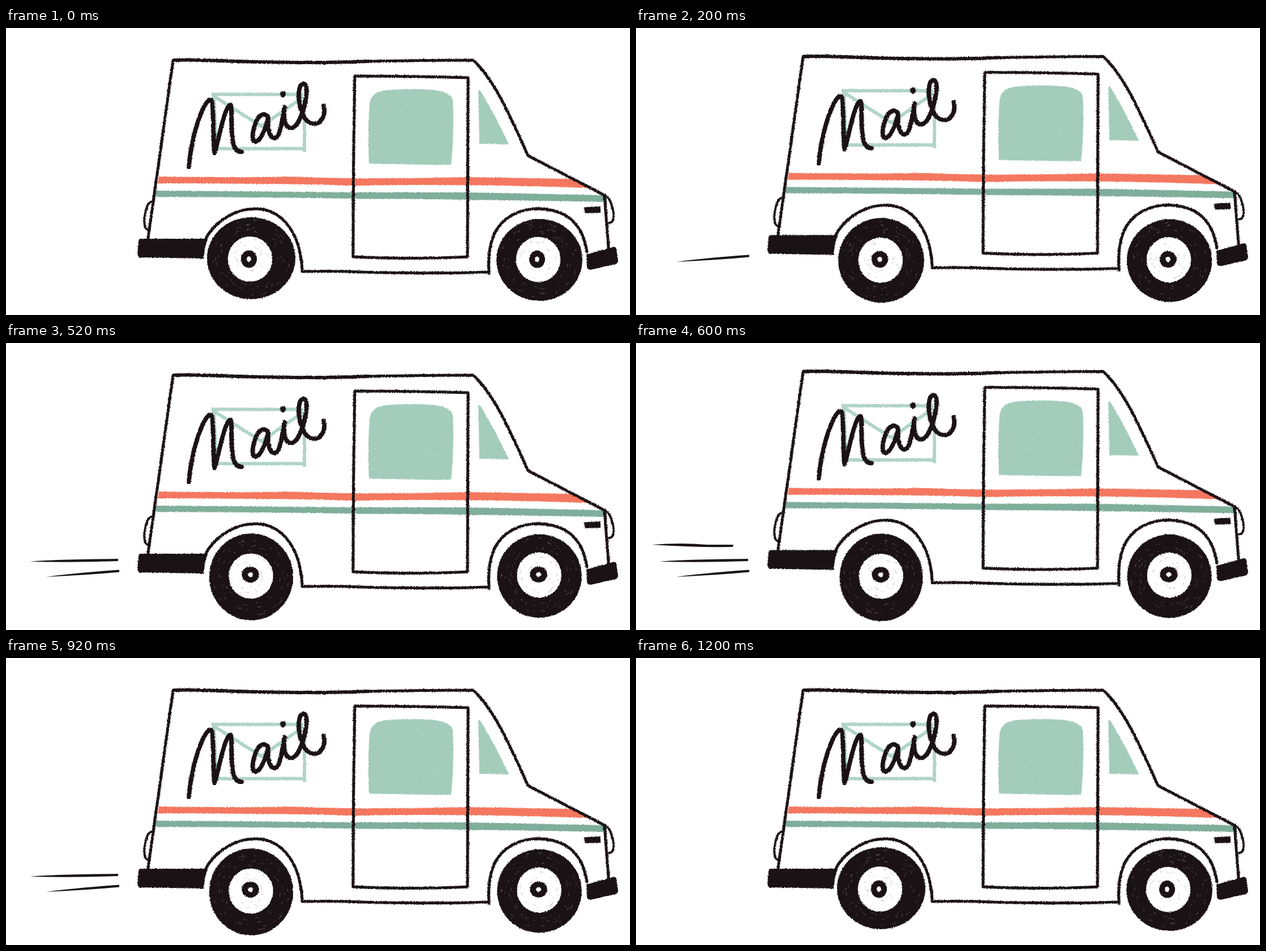
Animation of 1102 by 508 pixels, one loop 1400 ms. Source, as an HTML page:

```html
<!DOCTYPE html>
<html lang="en">
<head>
<meta charset="utf-8">
<title>Mail truck</title>
<style>
  html, body { margin: 0; height: 100%; overflow: hidden; background: #fff; }
  svg { display: block; width: 100vw; height: 100vh; }
  .line { fill: none; stroke: #1b1216; stroke-width: 5.1; stroke-linecap: round; stroke-linejoin: round; }
  .thin { stroke-width: 4; }
  .roof { stroke-width: 6; }
  .lettering { stroke-width: 7.8; }
  .ink { fill: #1b1216; }
  .paper { fill: #fff; }
  .glass { fill: #a3ccba; }
  .flecks { fill: none; stroke-width: .9; stroke-linecap: round; }
</style>
</head>
<body>
<svg viewBox="0 0 1102 508">
  <defs>
    <filter id="crayon" filterUnits="userSpaceOnUse" x="0" y="0" width="1102" height="520" color-interpolation-filters="sRGB">
      <feTurbulence type="fractalNoise" baseFrequency=".5" numOctaves="2" seed="4" result="noise"/>
      <feDisplacementMap in="SourceGraphic" in2="noise" scale="3.5" xChannelSelector="R" yChannelSelector="G"/>
    </filter>
  </defs>

  <g id="body" filter="url(#crayon)">
    <!-- windows, stripes, envelope -->
    <path class="glass" d="M641 240C639 200 640 150 643 130Q648 112 672 110Q715 106 757 110Q788 114 789 129Q792 180 786 242Q710 242 641 240Z"/>
    <path class="glass" d="M834 110L836 205L888 206Q862 150 837 110Z"/>
    <path id="glassFlecks" class="flecks" stroke="#c0ddd0"/>
    <path fill="#f4775f" d="M270 263Q440 265 500 263Q560 265 613 266Q720 266 815 264L997 267L1028 283Q900 279 815 278Q720 277 613 279Q500 275 268 275Z"/>
    <path fill="#7fae9b" d="M265 288Q440 289 613 291L815 291L1057 296V308Q820 303 613 302Q440 299 265 299Z"/>
    <path fill="none" stroke="#b0d4c7" stroke-width="6" stroke-linejoin="round" d="M363 117.5H525M367 118L371 213M372 213.5H527M527 122V219M366 120L451 174L525 122"/>

    <!-- shell, door, arches, lamps, bumpers -->
    <path class="line" d="M295 58L251 372M295 58Q315 55 350 57Q520 64 640 59Q740 57 825 57C857 86 882 136 922 226L1057 296L1064 389"/>
    <path class="line roof" d="M296 57Q315 56 350 57Q520 64 640 59"/>
    <path class="line" d="M616 85Q720 85 816 88Q815 240 815 405Q710 410 613 405Q613 240 616 85Z"/>
    <path class="line" d="M351 377C365 346 400 321 440 320C490 320 521 366 523 431Q560 430 600 431Q720 436 853 432M853 435C850 385 858 330 930 320C990 318 1018 346 1026 396"/>
    <path class="line thin" d="M256 308C247 310 243 340 245 349Q246 356 251 357M1057 297C1068 298 1074 325 1073 337Q1071 345 1065 345"/>
    <path class="ink" d="M238 373L356 373Q351 387 349 408L236 406Q232 404 232 398L234 378Q234 373 238 373ZM1025 401L1071 388Q1077 386 1078 391L1081 412Q1081 416 1076 418L1032 428Q1027 428 1026 423ZM1022 317L1050 316L1050 327L1023 328Q1020 322 1022 317Z"/>

    <g class="line lettering" role="img" aria-label="Mail">
      <path d="M323 246C325 215 335 170 348 143C354 130 362 121 364 132C367 150 365 190 368 221C374 208 380 165 390 144C394 135 398 133 398 143C398 165 398 192 402 207Q407 220 416 219"/>
      <path d="M463 158C455 147 445 155 440 170C434 188 434 201 441 201C450 200 458 178 463 160C461 178 466 196 475 195C485 192 487 165 492 140C489 165 494 178 505 177C520 173 530 130 531 112C531 98 523 94 519 105C514 122 519 146 528 160C535 170 548 173 555 165C563 157 563 146 561 138"/>
    </g>
    <circle class="ink" cx="489" cy="117" r="5.4"/>
  </g>

  <g id="wheels" filter="url(#crayon)"></g>

  <g id="speed" class="ink">
    <path d="M71 414Q110 408 200 401.5L200 405.5Q140 411 71 414Z"/>
    <path d="M42 387Q80 383 198 382L198 386Q120 389 42 387Z"/>
    <path d="M28 357Q80 353 125 357L172 357L171 361Q100 362 28 357Z"/>
  </g>
</svg>

<script>
const STEP = 200, TURN = 3;
const find = id => document.getElementById(id);
let seed = 7;
const random = () => (seed = seed * 16807 % 2147483647) / 2147483647;
const between = (low, high) => low + random() * (high - low);

const oval = (cls, cx, cy, rx, ry) =>
  `<ellipse class="${cls}" cx="${cx}" cy="${cy}" rx="${rx}" ry="${ry}"/>`;

function flecks(color, count, cx, cy, near, far) {
  const point = (r, a) => `${cx + r * Math.cos(a)} ${cy + r * Math.sin(a)}`;
  let d = '';
  for (let i = 0; i < count; i++) {
    const r = between(near, far), a = between(0, 2 * Math.PI);
    d += `M${point(r, a)}A${r} ${r} 0 0 1 ${point(r, a + between(1, 6) / r)}`;
  }
  return `<path class="flecks" stroke="${color}" d="${d}"/>`;
}

// drop runs 0..1 as the wheel sinks and stretches; give scales how much it does so
function wheel(x, y, give, drop) {
  const tyreY = y + 7.5 * give * drop;
  const hubX = x - 2 + 1.8 * drop, hubY = 410 + give * (4 * drop - 1);
  const axleX = x - 4 + 3 * drop, axleY = 409.5 + give * (drop - .5);
  const squash = 1.5 * drop;
  return oval('ink', x, tyreY, 75 + give * (3 - 4.5 * drop), 72.5 + 5 * give * drop) +
    flecks('#62595d', 70, x, tyreY, 46, 69) +
    oval('paper', hubX, hubY, 39.3, 40) + flecks('#c4c0c1', 26, hubX, hubY, 18, 37) +
    oval('ink', axleX, axleY, 14 + squash, 15.5 - squash) +
    oval('paper', axleX, axleY, 3.8 + squash / 2, 4.8 - squash / 2);
}

for (let pose = 0; pose <= TURN; pose++) {
  const drop = Math.sin(pose / TURN * Math.PI / 2);
  find('wheels').innerHTML += `<g>${wheel(433, 407.5, 1, drop)}${wheel(942, 410.5, .3, drop)}</g>`;
}

let dots = '';
for (let i = 0; i < 80; i++) dots += `M${between(646, 782)} ${between(122, 234)}h1`;
find('glassFlecks').setAttribute('d', dots);

const wheelPoses = [...find('wheels').children];
const speedLines = [...find('speed').children];
const show = (el, on) => el.setAttribute('visibility', on ? 'visible' : 'hidden');

// Poses run 0 1 2 3 2 1 0; the body hops on the odd ones
function draw() {
  const step = Math.floor(performance.now() / STEP) % (2 * TURN + 1);
  const pose = TURN - Math.abs(TURN - step);
  find('body').setAttribute('transform', `translate(0 ${pose % 2 ? -6.5 : 0})`);
  wheelPoses.forEach((el, i) => show(el, i === pose));
  speedLines.forEach((el, i) => show(el, i < pose));
  requestAnimationFrame(draw);
}
draw();
</script>
</body>
</html>
```
